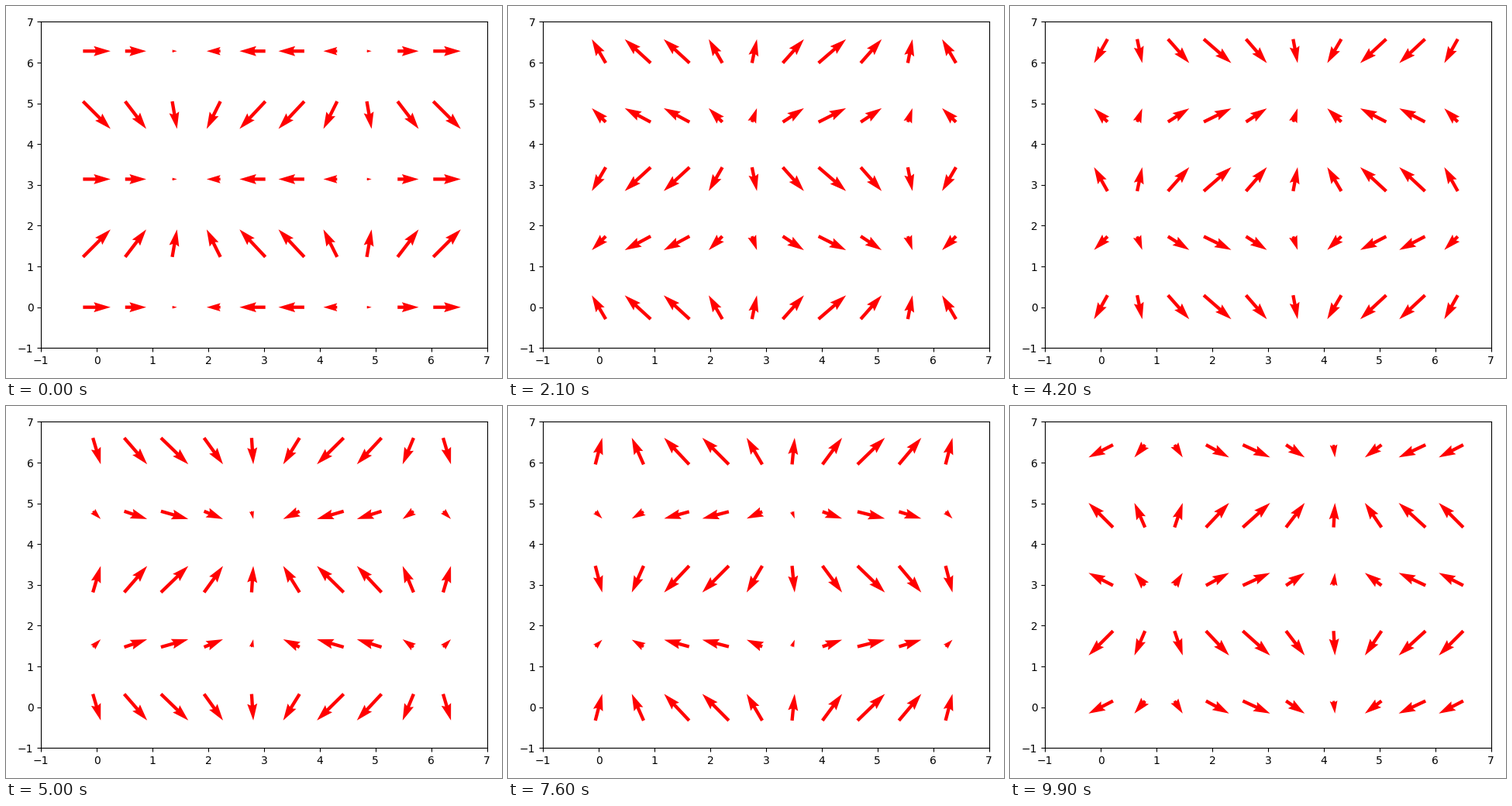
A matplotlib script for the animation above (10 s loop, 640 px wide and 480 px high).

```python
import numpy as np
import matplotlib.pyplot as plt
from matplotlib.animation import FuncAnimation

FRAMES = 100
INTERVAL = 100  # ms
STEP = 0.1      # phase advance per frame, radians

X, Y = np.mgrid[:2 * np.pi:10j, :2 * np.pi:5j]


def field(phase):
    return np.cos(X + phase), np.sin(Y + phase)


fig, ax = plt.subplots(figsize=(6.4, 4.8), dpi=100)
arrows = ax.quiver(X, Y, *field(0), pivot="mid", color="r", units="inches")
ax.set_xlim(-1, 7)
ax.set_ylim(-1, 7)
fig.tight_layout()
fig.canvas.draw()  # fixes the arrow scale from the initial field


def update(i):
    arrows.set_UVC(*field(i * STEP))
    return arrows,


anim = FuncAnimation(fig, update, frames=FRAMES, interval=INTERVAL,
                     repeat=True, repeat_delay=0, blit=False)
plt.show()
```
